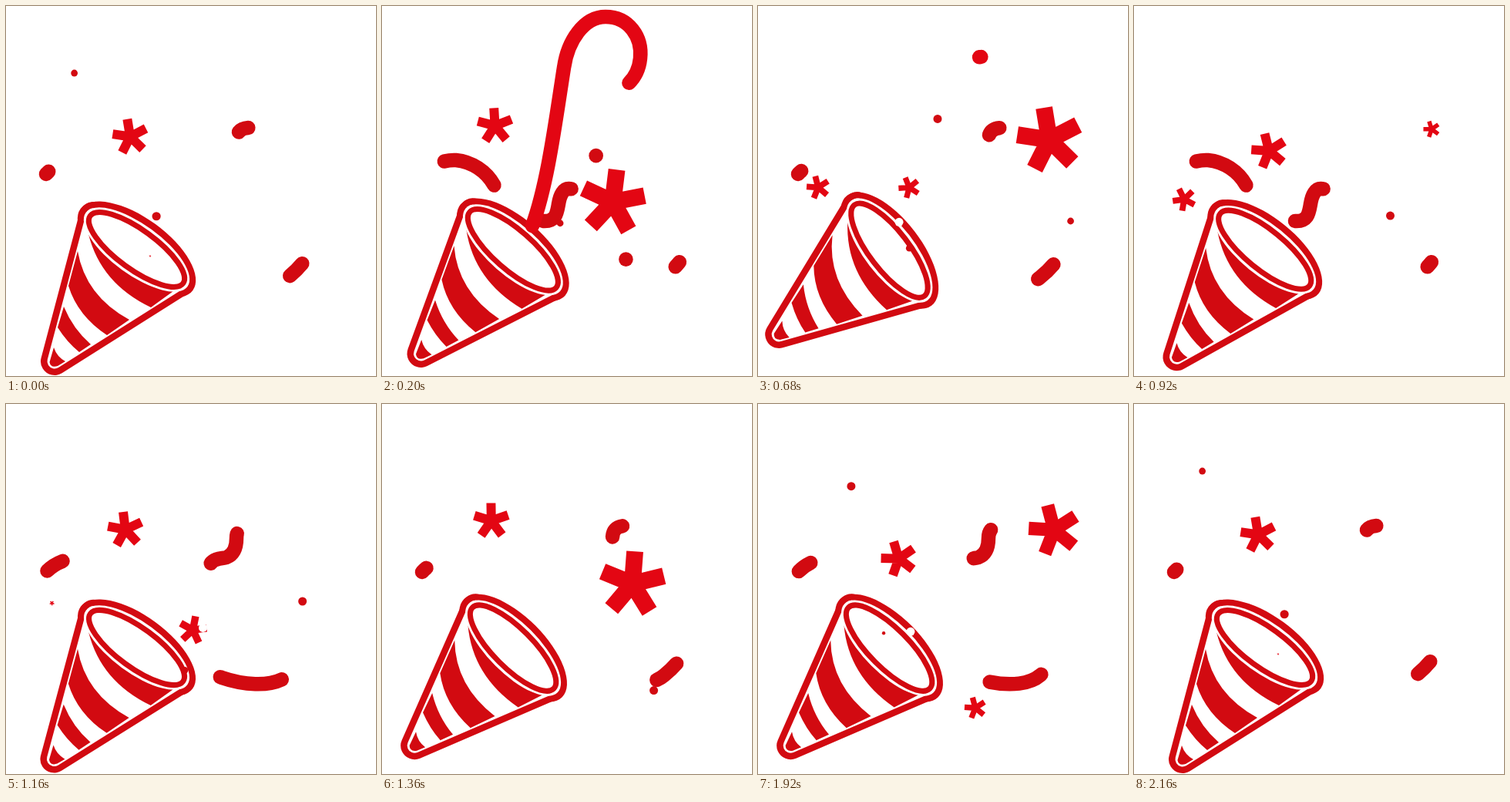
Animation of 480x480 px, one loop 2200 ms. Source, as an HTML page:

```html
<!DOCTYPE html>
<html>
<head>
<meta charset="utf-8">
<title>Party popper</title>
<style>
  html, body { margin: 0; width: 100%; height: 100%; overflow: hidden; background: #fff; }
  svg { display: block; width: 100vw; height: 100vh; }
</style>
</head>
<body>
<svg viewBox="0 0 480 480">
  <g id="cone" fill="#d20a11" stroke-linejoin="round">
    <path d="M63 461L113 272L227 357.5Z" stroke="#d20a11" stroke-width="36"/>
    <ellipse rx="90" ry="41" transform="translate(169.5 316) rotate(36)"/>
    <path d="M63 461L113 272L227 357.5Z" fill="#fff" stroke="#fff" stroke-width="19"/>
    <path d="M107 296Q123 360 188 391L217 370Q150 345 107 296Z"/>
    <path d="M93 318Q103 376 160 407L131 427Q93 402 81 363Z"/>
    <path d="M75 390Q87 419 110 439L95 449Q79 436 67 417Z"/>
    <path d="M62 443Q66 455 77 461L67 467Q58 470 56.5 462Z"/>
    <g transform="translate(169.5 316) rotate(36)">
      <ellipse rx="81.5" ry="32.5" fill="#fff"/>
      <ellipse rx="74.5" ry="25.5" fill="none" stroke="#d20a11" stroke-width="7"/>
    </g>
  </g>
  <g id="confetti"></g>
</svg>
<script>
const STEP = 40, LOOP = 2200, CYCLE = 2160;
const DARK = '#d20a11', BRIGHT = '#e30613', WHITE = '#fff';
const cone = document.getElementById('cone');
const confetti = document.getElementById('confetti');
const parts = [];

function make(tag, attrs) {
  const el = document.createElementNS('http://www.w3.org/2000/svg', tag);
  for (const name in attrs) el.setAttribute(name, attrs[name]);
  return el;
}

// Share of a route covered: quick at first, then slowing down
const glide = (age, rate) => 1 - Math.exp(-rate * Math.max(0, age));

// Shows a part for its life span, several times per cycle if asked
function launch(tag, attrs, { born, life, times = 1 }, pose) {
  for (let k = 0; k < times; k++) {
    const el = confetti.appendChild(make(tag, attrs));
    const start = born + k * CYCLE / times;
    parts.push(t => {
      const age = (t - start + 2 * CYCLE) % CYCLE;
      el.style.display = age < life ? '' : 'none';
      if (age < life) pose(el, age);
    });
  }
}

// The head runs along the path, the tail follows after a lag
function streamer(color, d, { born, times, rate, lag, tailRate }) {
  const total = make('path', { d }).getTotalLength();
  const attrs = { d, fill: 'none', stroke: color, 'stroke-width': 18.5, 'stroke-linecap': 'round' };
  launch('path', attrs, { born, times, life: 780 }, (el, age) => {
    const head = total * glide(age, rate);
    const tail = total * glide(age - lag, tailRate);
    el.setAttribute('stroke-dasharray', `${Math.max(head - tail, 0.1)} ${total * 2}`);
    el.setAttribute('stroke-dashoffset', -tail);
  });
}

// A unit-sized shape that grows, glides along a route, spins and shrinks
function fly(tag, attrs, route, { size, rate, grow, fade, turn = 0, spin = 0, ...timing }) {
  const path = make('path', { d: route }), total = path.getTotalLength();
  launch(tag, attrs, timing, (el, age) => {
    const { x, y } = path.getPointAtLength(total * glide(age, rate));
    const r = size * Math.min(1, age / grow, (timing.life - age) / fade);
    el.setAttribute('transform', `translate(${x} ${y}) rotate(${turn + spin * age}) scale(${r})`);
  });
}

const arms = [0, 1, 2, 3, 4].map(i => {
  const a = i * Math.PI * 0.4;
  return `M0 0L${Math.sin(a)} ${-Math.cos(a)}`;
}).join('');

const star = (route, options) =>
  fly('path', { d: arms, stroke: BRIGHT, 'stroke-width': 0.52 }, route, { grow: 200, fade: 150, ...options });

const dot = (color, born, life, route, size = 5.5) =>
  fly('circle', { r: 1, fill: color }, route, { born, life, size, rate: 0.004, grow: 50, fade: 50 });

streamer(DARK,
  'M209 279C226 280 227 268 229 257C231 244 236 237 242 237C262 239 260 222 264 210C268 199 280 201 286 199C296 195 299 185 299 174C299 163 305 158 317 158',
  { born: 140, times: 3, rate: 0.007, lag: 150, tailRate: 0.0055 });
streamer(DARK,
  'M175 322C184 336 196 341 210 339C240 331 260 348 280 355C315 367 350 366 366 352C376 344 382 337 386 332',
  { born: 240, times: 3, rate: 0.009, lag: 80, tailRate: 0.0055 });
streamer(DARK,
  'M153 270C157 232 128 203 96 200C80 199 62 207 52 218',
  { born: 65, times: 3, rate: 0.011, lag: 85, tailRate: 0.006 });
streamer(BRIGHT,
  'M195 285C215 230 225 150 236 80C241 45 262 14 290 14C320 14 338 40 335 68C332 97 310 113 290 112C278 111 270 108 264 100C253 83 256 50 287 50C310 50 317 76 304 90C290 102 266 88 272 74C275 68 282 66 294 66',
  { born: 80, rate: 0.008, lag: 156, tailRate: 0.01 });

star('M182 327Q350 240 392 148', { born: -6, life: 964, times: 2, size: 42, rate: 0.0033, turn: 14, spin: -0.034 });
star('M203 272Q192 172 112 133', { born: 560, life: 1020, times: 2, size: 23, rate: 0.002, turn: -25, spin: 0.03 });
star('M165 270C140 180 95 205 55 265', { born: 215, life: 975, size: 15, rate: 0.0032, turn: 9, spin: -0.05 });
star('M205 335Q285 340 282 405', { born: 1440, life: 620, size: 15, rate: 0.005, turn: 14, spin: -0.06 });

dot(DARK, 1560, 640, 'M172 300Q150 60 65 90');
dot(DARK, 1900, 250, 'M160 307L200 180');
dot(DARK, 2130, 440, 'M176 291L345 130', 9.3);
dot(DARK, 40, 380, 'M185 323L463 335', 9.3);
dot(DARK, 160, 280, 'M190 310L468 119');
dot(DARK, 320, 400, 'M198 308L470 270');
dot(DARK, 320, 420, 'M146 309L260 96');
dot(DARK, 640, 620, 'M158 326L417 246');
dot(DARK, 1120, 520, 'M194 337L451 393');

dot(WHITE, 300, 160, 'M164 315L230 130', 9);
dot(WHITE, 620, 160, 'M160 317L268 145');
dot(WHITE, 1100, 160, 'M215 312L405 211');
dot(WHITE, 1860, 160, 'M170 325L301 186');

const ease = x => x * x * x * (x * (6 * x - 15) + 10);
const ramp = (t, from, to) => ease(Math.min(1, Math.max(0, (t - from) / (to - from))));

function draw(t) {
  const beat = t % (LOOP / 2);
  const swing = ramp(beat, 0, 520) - ramp(beat, 560, 1080);
  cone.setAttribute('transform', `rotate(${18 * swing} 166 320)`);
  parts.forEach(update => update(Math.min(t, CYCLE)));
}

let begin;
function frame(now) {
  begin ??= now;
  draw(Math.floor((now - begin) % LOOP / STEP) * STEP);
  requestAnimationFrame(frame);
}
draw(0);
requestAnimationFrame(frame);
</script>
</body>
</html>
```
